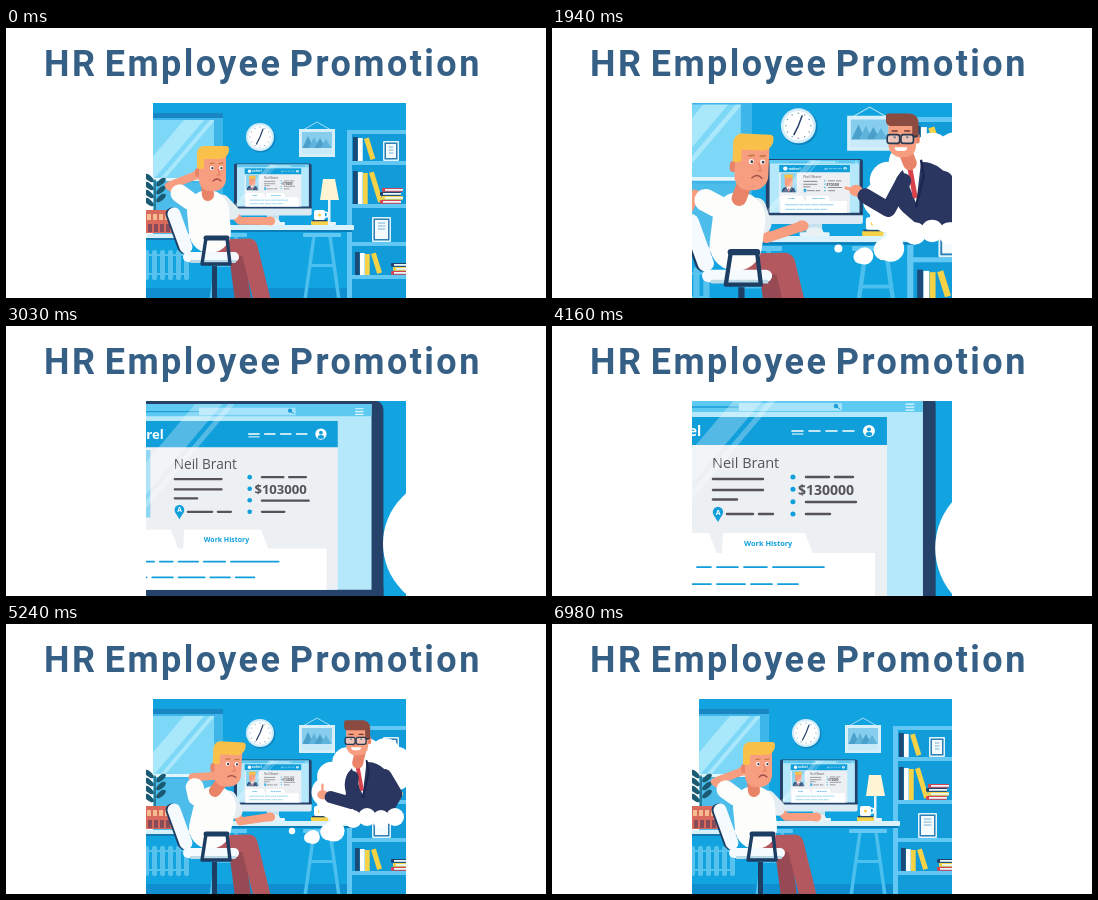
Write an HTML page with a canvas that moves like this. It is 540 px wide and 270 px high and loops after 7.02 s.

```html
<!DOCTYPE html>
<html lang="en">
<head>
<meta charset="utf-8">
<title>HR Employee Promotion</title>
<style>
  html, body { margin: 0; width: 100%; height: 100%; overflow: hidden; background: #fff; }
  h1 { position: absolute; left: 38px; top: 15px; margin: 0; white-space: nowrap; color: #355f85;
       font: bold 36px/42px Roboto, sans-serif; letter-spacing: 2.45px; word-spacing: -4px; }
  canvas { position: absolute; left: 0; top: 0; }
</style>
</head>
<body>
<h1>HR Employee Promotion</h1>
<canvas id="stage" width="540" height="270"></canvas>
<script>
const c = document.getElementById('stage').getContext('2d');
const LOOP = 7020;
const WALL = '#12a4e0', LIGHT = '#62c8f3', PALE = '#b5e8fb', NAVY = '#25426a', WHITE = '#fff',
      SKIN = '#f79d80', SHADE = '#e98468', BLOND = '#f9c04a', RED = '#d9434e', YELLOW = '#f6d247',
      SHIRT = '#fdfdfb', SUIT = '#2a3560', BROWN = '#8c4b40', BLUE = '#109fdb', INK = '#55525a';

// Timing: each step is [start, duration, pose], eased from the pose before it.
const clamp = v => Math.min(1, Math.max(0, v));
const mix = (a, b, u) => a + (b - a) * u;
function ease(t, start, span) {
  const u = clamp((t - start) / span);
  return u * u * (3 - 2 * u);
}
function play(t, first, steps) {
  return steps.reduce((pose, [start, span, next]) => {
    const u = ease(t, start, span), out = {};
    for (const key in pose) out[key] = mix(pose[key], next[key], u);
    return out;
  }, first);
}

// Drawing helpers
function rect(color, x, y, w, h, r = 0) {
  c.fillStyle = color;
  c.beginPath();
  c.roundRect(x, y, w, h, r);
  c.fill();
}
function dot(color, x, y, r, ry = r) {
  c.fillStyle = color;
  c.beginPath();
  c.ellipse(x, y, r, ry, 0, 0, 7);
  c.fill();
}
function trace(p) {
  c.beginPath();
  for (let i = 0; i < p.length; i += 2) c.lineTo(p[i], p[i + 1]);
}
function poly(color, ...p) {
  c.fillStyle = color;
  trace(p);
  c.fill();
}
function line(color, width, ...p) {
  c.strokeStyle = color;
  c.lineWidth = width;
  c.lineCap = c.lineJoin = 'round';
  trace(p);
  c.stroke();
}
function text(s, x, y, font, color) {
  c.font = font + ' "Open Sans", sans-serif';
  c.fillStyle = color;
  c.fillText(s, x, y);
}
function group(x, y, scale, draw, angle = 0) {
  c.save();
  c.translate(x, y);
  c.rotate(angle);
  c.scale(scale, scale);
  draw();
  c.restore();
}
function repeat(n, draw) {
  for (let i = 0; i < n; i++) draw(i);
}
// A row of dashes with the given lengths, 4 px apart.
function dashes(color, width, x, y, ...lengths) {
  for (const w of lengths) {
    line(color, width, x + 1, y, x + w - 1, y);
    x += w + 4;
  }
}
// A slanted streak of light down a pane.
function streak(color, x, y, w, h) {
  poly(color, x, y, x + w, y, x + w - h * .85, y + h, x - h * .85, y + h);
}

function frame(x, base, w, h) {
  rect('#dff4fd', x, base - h, w, h, 1);
  rect('#2d7fb5', x + 1.5, base - h + 1.5, w - 3, h - 3);
  rect('#f4fbff', x + 3, base - h + 3, w - 6, h - 6);
  repeat(3, i => line('#7cb4d4', 1, x + 6, base - h + 6 + i * 3, x + w - 6, base - h + 6 + i * 3));
}
function books(x, base, h, n) {
  repeat(n, i => {
    const top = base - h + i * 5 % 4;
    rect(['#1c4a78', WHITE, YELLOW][i % 3], x + i * 5, top, 4.7, base - top);
  });
  group(x + n * 5 + 1, base - h + 2, 1, () => rect(YELLOW, 0, 0, 5, h - 2), -.3);
}
function stack(x, base, n) {
  repeat(n, i => {
    rect([RED, YELLOW, NAVY][i % 3], x + i % 2 * 2, base - 4 - i * 4, 21, 3.8, 1);
    rect('#eaf7fd', x + i % 2 * 2 + 3, base - 3 - i * 4, 18, 1.8);
  });
}

function windowSide() {
  rect('#3fb6ea', 147, 85, 70, 122);
  rect('#1786c3', 147, 85, 70, 5);
  rect('#7dd8f7', 147, 92, 61, 58);
  rect('#4cbcea', 147, 155, 58, 51);
  c.save();
  c.beginPath();
  c.rect(147, 92, 61, 58);
  c.clip();
  streak('#a9e7fb', 178, 92, 20, 58);
  streak('#a9e7fb', 204, 92, 5, 58);
  c.restore();
  rect('#e2f5fd', 147, 150, 66, 3);
  // plant, box, sill, radiator
  line('#1b5d6c', 1.4, 149, 184, 149, 152);
  repeat(7, i => {
    const side = i % 2 * 2 - 1;
    group(149 + side * 6, 150 + i * 4, 1, () => dot('#1a5a72', 0, 0, 6, 2.6), -side * .7);
  });
  rect('#d9685d', 140, 182, 26, 23);
  repeat(4, i => {
    rect('#f7bd91', 141 + i * 6, 186, 4, 6);
    rect('#874b59', 142 + i * 6, 196, 4, 8);
  });
  rect('#d7f1fc', 136, 206, 74, 4);
  rect('#1878b0', 136, 210, 72, 2);
  repeat(6, i => rect('#58c2ef', 138 + i * 8, 222, 5, 30, 2));
  for (const y of [226, 245]) rect('#58c2ef', 138, y, 44, 2);
}
function clock() {
  dot('#0c86c2', 255, 110, 14.5);
  dot('#d2edf9', 254, 109, 14);
  dot(WHITE, 254, 109, 11.8);
  repeat(12, i => {
    const a = i * Math.PI / 6;
    dot('#7598ac', 254 + Math.sin(a) * 10, 109 + Math.cos(a) * 10, .6);
  });
  line(NAVY, 1.2, 257, 101, 254, 109, 250.5, 116);
}
function picture() {
  line('#c7ecfb', .8, 297, 102, 311, 94, 325, 102);
  rect('#d6effa', 293, 101, 36, 28);
  rect('#86cdee', 296, 104, 30, 22);
  repeat(4, i => poly(i % 2 ? '#5fb2da' : '#4a9fcb', 296 + i * 6, 121, 302 + i * 6, 108 + i * 5 % 4, 308 + i * 6, 121));
  rect('#c9eaf8', 296, 120, 30, 6);
}
function shelves() {
  rect('#119bd8', 341, 102, 70, 170);
  rect(LIGHT, 341, 102, 5, 170);
  for (const y of [102, 133, 176, 214, 247]) rect(LIGHT, 341, y, 70, 4);
  books(347, 133, 24, 2);
  frame(377, 133, 16, 20);
  books(347, 176, 33, 3);
  stack(374, 176, 4);
  frame(366, 214, 19, 25);
  books(349, 247, 23, 3);
  stack(385, 247, 3);
}
function desk() {
  for (const x of [316, 222]) {
    line('#4bbfee', 3.5, x - 8, 208, x - 17, 272);
    line('#4bbfee', 3.5, x + 8, 208, x + 17, 272);
    rect(LIGHT, x - 19, 205, 38, 4, 1);
    rect('#4bbfee', x - 12, 236, 24, 3);
  }
  rect('#d9f2fd', 200, 197, 148, 5, 1);
  rect('#0b7db9', 204, 202, 142, 2);
  // lamp
  poly('#fff4d4', 317, 151, 329, 151, 333, 172, 314, 172);
  rect('#e8f4f8', 322, 172, 2.5, 22);
  rect('#e8f4f8', 317, 194, 13, 3, 1);
  // mug on books
  rect(YELLOW, 305, 193, 17, 4, 1);
  rect(NAVY, 306, 192, 15, 1.3);
  rect(WHITE, 308, 182, 11, 10, 2);
  line(WHITE, 1.5, 319, 184, 322, 185, 321, 189, 319, 189);
  dot(YELLOW, 313.5, 187, 1.6);
}
function room() {
  rect(WALL, 147, 75, 300, 240);
  rect(WALL, 130, 206, 30, 110);
  rect('#0f8fd0', 130, 260, 300, 60);
  windowSide();
  clock();
  picture();
  shelves();
  desk();
}

// Drawn at close-up size, then placed inside the monitor.
function page(t) {
  const pay = t < 6600 ? mix(70, 130, ease(t, 2500, 1000)) : 70;
  rect(PALE, 33, 73, 338, 198);
  rect('#5fcaf1', 33, 73, 338, 13);
  rect('#a5e3fa', 187, 77, 103, 8, 1);
  dashes('#1b9fd9', 1.5, 105, 81, 82);
  dot('#1b9fd9', 284, 80, 2.2);
  line('#1b9fd9', 1, 285, 81, 288, 83);
  repeat(3, i => dashes('#e2f7ff', 1.2, 353, 78 + i * 3, 10));
  rect('#edf0f3', 69, 91, 266, 180);
  rect(BLUE, 69, 91, 266, 28);
  dot(WHITE, 92, 105, 8);
  text('nobrel', 104, 110, 'bold 14px', WHITE);
  dashes(WHITE, 1.6, 239, 105, 13, 13, 13, 13);
  dashes(WHITE, 1, 239, 108, 13);
  dot(WHITE, 317, 105, 6);
  dot(BLUE, 317, 103.5, 2);
  dot(BLUE, 317, 108, 3.3, 2);
  // portrait
  rect('#8ed7f3', 75, 122, 60, 72);
  rect(NAVY, 80, 174, 50, 20, [18, 18, 0, 0]);
  poly(WHITE, 96, 174, 114, 174, 105, 190);
  line(RED, 4, 105, 179, 105, 190);
  rect(SKIN, 90, 135, 30, 39, 11);
  rect(BLOND, 89, 127, 32, 13, 4);

  text('Neil Brant', 160, 142, '14.5px', INK);
  dashes(INK, 2.4, 160, 153, 52);
  dashes(INK, 2.4, 160, 164, 52);
  dashes(INK, 2.4, 160, 173.5, 26);
  dashes(INK, 2.4, 174, 188, 28, 16);
  poly(BLUE, 161.5, 188.5, 170.5, 188.5, 166, 196);
  dot(BLUE, 166, 186, 5.2);
  text('A', 163.7, 188.6, 'bold 7px', WHITE);
  repeat(4, i => dot(BLUE, 241, 151 + i * 12.3, 2.5));
  dashes(INK, 2.4, 253, 151, 25, 20);
  dashes(INK, 2.4, 253, 176, 52);
  dashes(INK, 2.4, 253, 188, 26);
  text('$' + Math.round(pay) * 1000, 246, 168.5, 'bold 14px', INK);

  ['Profile', 'Work History'].forEach((name, i) => {
    const x = 75 + i * 96;
    poly(WHITE, x, 207, x + 82, 207, x + 90, 228, x - 1, 228);
    text(name, x + (i ? 21 : 29), 220, 'bold 7.4px', BLUE);
  });
  rect(WHITE, 75, 227, 248, 44);
  dashes(BLUE, 1.8, 92, 241, 48, 16, 23, 25, 53);
  dashes(BLUE, 1.8, 92, 258, 40, 24, 30, 23, 22);
  streak('#ffffff48', 183, 73, 29, 198);
  streak('#ffffff48', 218, 73, 7, 198);
}
function monitor(t) {
  rect('#c6e2ee', 261, 186, 12, 9);
  rect('#e6f5fb', 255, 194, 24, 3, 1);
  rect(NAVY, 228, 135.6, 77.6, 46, 2);
  rect('#dcebf3', 228, 180, 77.6, 7.5, [0, 0, 2, 2]);
  rect(NAVY, 228, 178, 77.6, 2.5);
  group(223.96, 120.85, 1 / 4.7, () => page(t));
}

// Two-bone arm: the elbow follows from shoulder, hand and the side it bends to.
function arm(sx, sy, hx, hy, bend, upper, sleeve, draw) {
  const dx = hx - sx, dy = hy - sy, d = Math.hypot(dx, dy);
  const along = (26 * 26 - 30 * 30 + d * d) / (2 * d);
  const out = bend * Math.sqrt(Math.max(0, 26 * 26 - along * along));
  const ex = sx + (dx * along - dy * out) / d, ey = sy + (dy * along + dx * out) / d;
  line(SKIN, 8, sx, sy, ex, ey, hx, hy);
  dot(SKIN, hx, hy, 5.2, 4.6);
  draw(ex, ey, mix(sx, ex, upper), mix(sy, ey, upper));
}
function fingers(x, y, n, length) {
  repeat(n, i => line(SKIN, 2.3, x, y, x + (i - (n - 1) / 2) * 3.5, y - length));
}

// x, y: head; hx, hy: left hand seen from the head; rx, ry: right hand.
const think = { x: 206, y: 143, hx: -15, hy: 4, bend: -1, rx: 264, ry: 193, mood: -1 };
const panic = { ...think, x: 187, hx: -43, hy: 24, rx: 221, ry: 169 };
const watch = { ...think, x: 222, y: 140, hx: -58, hy: 50, bend: 1 };
const ponder = { ...think, x: 224 };
const cheer = { ...think, y: 141, hx: 22, hy: 40, bend: 1, mood: 1 };
const MAN = [[100, 550, panic], [1480, 620, watch], [3400, 900, ponder], [5130, 470, cheer], [6050, 550, think]];

function manHead(mood) {
  rect(SHADE, -17, -3, 7, 9, 3);
  rect(SKIN, -13, -17, 27, 37, [3, 3, 12, 11]);
  rect(BLOND, -15, -25, 32, 13, [7, 3, 9, 2]);
  rect(BLOND, -15, -18, 7, 16, 2);
  for (const x of [0, 9]) {
    dot(WHITE, x, -3, 2);
    dot('#433b45', x + .4, -2.8, 1.1);
    line('#b87838', 1.2, x - 2, -7.5, x + 2, -8);
  }
  line(SHADE, 1.3, 6, -2, 8, 4, 5, 4);
  c.strokeStyle = '#9e4f49';
  c.lineWidth = 1.2;
  c.beginPath();
  c.moveTo(1, 10);
  c.quadraticCurveTo(5, 10 + mood * 4, 9, 10);
  c.stroke();
}
function man(t) {
  const p = play(t, think, MAN), lean = (p.x - think.x) * .45;
  // chair back, trousers
  line('#1d3d63', 13, 166, 186, 178, 219);
  line('#f4fafd', 13, 168, 186, 180, 219);
  line('#984a54', 16, 208, 219, 230, 219, 238, 280);
  line('#b3585f', 17, 204, 220, 243, 219, 258, 280);
  dot('#e9f1f5', 267, 194, 7, 4);
  arm(216 + lean, 174, p.rx, p.ry, 1, .55, 16, (ex, ey, x, y) => line('#e3edf2', 15, 216 + lean, 174, x, y));
  if (p.ry < 185) fingers(p.rx, p.ry, 3, 14);
  line(SHIRT, 42, 202 + lean, 183, 204, 204);
  line(SHADE, 12, p.x - 5, p.y + 14, 202 + lean, 167);
  const hx = p.x + p.hx, hy = p.y + p.hy;
  arm(184 + lean, 173, hx, hy, p.bend, .5, 18, (ex, ey, x, y) => line(SHIRT, 18, 184 + lean, 173, x, y));
  if (p.mood > 0) fingers(hx + 1, hy, 1, 10 * p.mood);
  if (lean < -4) fingers(hx, hy, 3, 12);
  group(p.x, p.y, 1, () => manHead(p.mood), lean / 120);
  // seat, armrest
  rect('#f4fafd', 177, 224, 56, 10, 5);
  rect('#bcd9e6', 184, 232, 46, 3, 1);
  rect('#1d3d63', 206, 238, 5, 40);
  line('#1d3d63', 3.4, 200, 210, 196, 236, 224, 236, 221, 210);
  line('#1d3d63', 5, 200, 210, 221, 210);
}

const wave = { x: 339, y: 121, hx: 325, hy: 91 };
const wear = { x: 338, y: 120, hx: 326, hy: 128 };
const point = { x: 337, y: 119, hx: 299, hy: 162 };
const relax = { x: 353, y: 116, hx: 320, hy: 171 };
const praise = { ...point, hx: 290, hy: 169 };
const BOSS = [[1150, 350, wear], [1500, 500, point], [2550, 500, relax], [5130, 520, praise]];

function bossHead() {
  rect(SHADE, 9, -4, 5, 8, 2);
  rect(SKIN, -11, -14, 22, 29, [3, 3, 9, 10]);
  rect(BROWN, -13, -20, 26, 10, [2, 8, 3, 4]);
  rect(BROWN, 8, -14, 5, 13, 2);
  for (const x of [-6, 4]) {
    line('#703a34', 1.2, x - 2, -6, x + 2, -6);
    dot('#3c343d', x, -1, 1);
  }
  line(SHADE, 1.2, -2, 0, -4, 5, -1, 5);
  rect(WHITE, -6, 7, 10, 3, [0, 0, 3, 3]);
}
function glasses(x, y) {
  for (const side of [-11, 0]) {
    rect('#dff3fa70', x + side, y - 3, 10, 7, 2);
    c.strokeStyle = '#263a52';
    c.lineWidth = 1.3;
    c.stroke();
  }
  line('#263a52', 1.3, x + 10, y - 1, x + 13, y - 2);
}
function boss(t) {
  const p = play(t, wave, BOSS), lean = (p.x - 350) * .6;
  const thumb = ease(t, 2600, 400), worn = ease(t, 1150, 330);
  const reach = () => {
    arm(346 + lean, 153, p.hx, p.hy, -1, 1, 12, (ex, ey) => {
      const x = mix(ex, p.hx, .72), y = mix(ey, p.hy, .72);
      line(WHITE, 9, x, y, mix(ex, p.hx, .77), mix(ey, p.hy, .77));
      line(SUIT, 12, 346 + lean, 153, ex, ey, x, y);
    });
    if (worn === 1) fingers(p.hx, p.hy, 1, 10 * thumb);
    if (thumb < 1 && worn === 1) line(SKIN, 2.5, p.hx, p.hy, p.hx - 8 * (1 - thumb), p.hy - 2);
  };
  if (worn < 1) reach();
  line(SUIT, 14, 378 + lean, 152, 389 + lean / 2, 170, 380, 186);
  line(SUIT, 46, 361 + lean, 161, 366, 172);
  group(352 + lean, 139, 1, () => {
    poly(WHITE, -9, 0, 8, -2, 4, 32);
    line(RED, 4, -1, 4, 3, 26);
    line('#1c2650', 2, 8, -2, 10, 10, 4, 34);
  });
  line(SHADE, 11, p.x + 3, p.y + 12, 351 + lean, 139);
  group(p.x, p.y, 1, bossHead);
  glasses(mix(p.hx + 2, p.x - 1, worn), mix(p.hy - 9, p.y, worn));
  if (worn === 1) reach();
}

// The bubbles come up one after another and go in the reverse order.
function thought(t) {
  const size = i => ease(t, 120 + i * 100, 300) * (1 - ease(t, 6520 - i * 50, 250));
  repeat(3, i => {
    const x = 286 + i * 21, y = 213 - Math.abs(i - 1) * 6, r = (3.2 + i * 3.7) * size(i);
    dot(WHITE, x, y, r);
    if (i) dot(WHITE, x - r * .5, y + r * .1, r * .8);
  });
  const k = size(3);
  if (!k) return;
  group(329 * (1 - k), 207 * (1 - k), k, () => {
    const ring = (from, to, r) => repeat(to - from, i => {
      const a = Math.PI + (i + from) * Math.PI * 2 / 11;
      const x = Math.cos(a) * 35.5;
      dot(WHITE, 356 + x, 156 - x * .34 + Math.sin(a) * 25, r);
    });
    dot(WHITE, 356, 156, 34, 30);
    ring(0, 11, 15);
    boss(t);
    repeat(5, i => dot(WHITE, 333 + i * 14, 193 + i % 2 * 2, 9));
  });
}

const CAMERA = [[1500, 680, { zoom: 1.35 }], [2500, 650, { zoom: 4.7 }], [4200, 520, { zoom: 1.1 }], [4800, 300, { zoom: 1 }]];

function render(t) {
  const { zoom } = play(t, { zoom: 1 }, CAMERA);
  c.clearRect(0, 0, 540, 270);
  c.save();
  c.beginPath();
  c.rect(140, 75, 260, 195);
  c.clip();
  group(284.5 * (1 - zoom), 153.5 * (1 - zoom), zoom, () => {
    room();
    monitor(t);
    man(t);
    thought(t);
  });
  c.restore();
}

const begin = performance.now();
(function tick() {
  render((performance.now() - begin) % LOOP);
  requestAnimationFrame(tick);
})();
</script>
</body>
</html>
```
